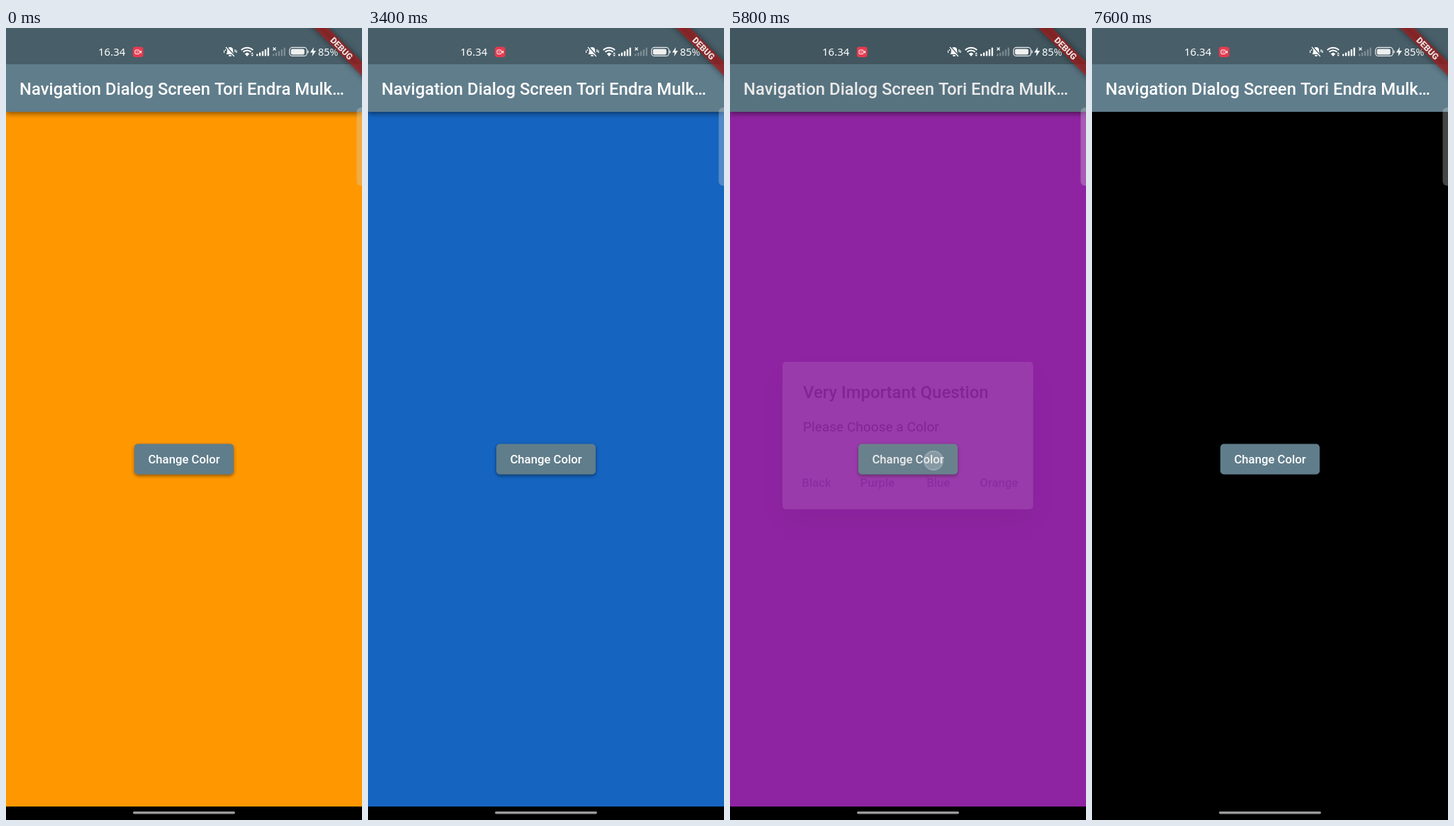
Animation of 502x1115 px, one loop 8 s. Source, as an HTML page with a canvas:

```html
<!DOCTYPE html>
<html lang="en">
<head>
<meta charset="utf-8">
<title>Dialog colour picker</title>
<style>
  html, body { margin: 0; width: 100%; height: 100%; overflow: hidden; background: #000; }
  canvas { display: block; width: 100vw; height: 100vh; }
</style>
</head>
<body>
<canvas id="stage" width="502" height="1115"></canvas>
<script>
const W = 502, H = 1115, LOOP = 8000;
const BODY_TOP = 118, BODY_END = 1096;
const ORANGE = '#ff9800', BLUE = '#1565c0', PURPLE = '#9c27b0', BLACK = '#000';
const SLATE = '#607d8b';
const SANS = 'Roboto, sans-serif';

const ctx = document.getElementById('stage').getContext('2d');

// Touch points: x, y, opacity
const onBlue = [304, 647, 1], onPurple = [231, 636, 0.9], onBlack = [128, 640, 1];
const onButton = [287, 609, 0.45];
// Pressed highlights: x, y, width, height, opacity
const pressBlue = [257, 619, 75, 42, 0.05], pressPurple = [179, 618, 67, 42, 0.2];
const pressBlack = [88, 619, 68, 42, 0.05];

// The screen changes in hard steps: start time, body colour, barrier, dialog opacity, press, touch
const steps = [
  [0, ORANGE, 0, 0],
  [2000, ORANGE, 1, 1],
  ...choose(3200, ORANGE, BLUE, pressBlue, onBlue),
  ...open(4200, BLUE),
  ...choose(5200, BLUE, PURPLE, pressPurple, onPurple),
  ...open(5800, PURPLE),
  ...choose(6500, PURPLE, BLACK, pressBlack, onBlack)
];

function open(t, color) {
  return [
    [t, color, 0.15, 0.1, null, onButton],
    [t + 100, color, 0.7, 0.6, null, onButton],
    [t + 200, color, 1, 0.9, null, onButton],
    [t + 300, color, 1, 1]
  ];
}

function choose(t, from, to, press, touch) {
  const held = [...press.slice(0, 4), 0.2];
  return [
    [t, from, 1, 1, press, touch],
    [t + 100, to, 0.69, 0.69, held, touch],
    [t + 200, to, 0, 0]
  ];
}

function rect(c, x, y, w, h, color, r = 0) {
  c.fillStyle = color;
  c.beginPath();
  c.roundRect(x, y, w, h, r);
  c.fill();
}

function text(c, str, x, y, font, color, align = 'left') {
  c.font = font;
  c.fillStyle = color;
  c.textAlign = align;
  c.fillText(str, x, y);
}

function poly(points, color = '#fff') {
  ctx.fillStyle = color;
  ctx.beginPath();
  points.forEach(([x, y]) => ctx.lineTo(x, y));
  ctx.fill();
}

function line(x1, y1, x2, y2, color = '#fff', width = 1.5) {
  ctx.strokeStyle = color;
  ctx.lineWidth = width;
  ctx.beginPath();
  ctx.moveTo(x1, y1);
  ctx.lineTo(x2, y2);
  ctx.stroke();
}

function arc(x, y, r, a, b, width) {
  ctx.strokeStyle = '#fff';
  ctx.lineWidth = width;
  ctx.beginPath();
  ctx.arc(x, y, r, a, b);
  ctx.stroke();
}

function shadow(c, color, blur, dy) {
  c.shadowColor = color;
  c.shadowBlur = blur;
  c.shadowOffsetY = dy;
}

// The dialog is one layer, so that it fades as a whole
const dialog = document.createElement('canvas');
dialog.width = W;
dialog.height = H;

function paintDialog() {
  const c = dialog.getContext('2d');
  c.save();
  shadow(c, 'rgba(0,0,0,.45)', 38, 20);
  rect(c, 74, 470, 353.5, 207.5, '#fff', 5);
  c.restore();
  text(c, 'Very Important Question', 103, 521, `500 23.9px ${SANS}`, '#1f1f21');
  text(c, 'Please Choose a Color', 103, 568, `400 19.1px ${SANS}`, '#1f1f21');
  [['Black', 122], ['Purple', 207.7], ['Blue', 293.8], ['Orange', 379.3]].forEach(([name, x]) =>
    text(c, name, x, 645.5, `500 16.7px ${SANS}`, SLATE, 'center'));
}

function paintPage(color) {
  rect(ctx, 0, 0, W, H, '#000');
  rect(ctx, 0, BODY_TOP, W, BODY_END - BODY_TOP, color);

  ctx.save();
  shadow(ctx, 'rgba(0,0,0,.45)', 7, 3);
  rect(ctx, 0, 0, W, BODY_TOP, SLATE);
  shadow(ctx, 'rgba(0,0,0,.45)', 5, 2);
  rect(ctx, 181, 585.5, 140, 43, SLATE, 5);
  ctx.restore();

  rect(ctx, 0, 0, W, 51, '#485e68');
  text(ctx, 'Navigation Dialog Screen Tori Endra Mulk…', 19, 93.6, `500 23.9px ${SANS}`, '#fff');
  text(ctx, 'Change Color', 251, 613, `500 16.7px ${SANS}`, '#fff', 'center');
}

function paintTouch([x, y, alpha]) {
  ctx.save();
  ctx.globalAlpha = alpha;
  ctx.beginPath();
  ctx.arc(x, y, 13.2, 0, 7);
  ctx.fillStyle = 'rgba(236,240,244,.5)';
  ctx.fill();
  ctx.strokeStyle = 'rgba(200,212,221,.85)';
  ctx.lineWidth = 2;
  ctx.stroke();
  ctx.restore();
}

function paintBell() {
  ctx.fillStyle = '#fff';
  ctx.beginPath();
  ctx.moveTo(310.5, 37);
  ctx.quadraticCurveTo(312, 35.5, 312, 32);
  ctx.arc(316, 31.2, 4.1, Math.PI, 0);
  ctx.quadraticCurveTo(320, 35.5, 321.5, 37);
  ctx.fill();
  rect(ctx, 314, 38, 4, 1.8, '#fff', 1);
  line(311, 26.5, 322.5, 39.5, '#485e68', 2);
  line(310, 27, 321.8, 40, '#fff', 1.3);
  line(307.6, 31.5, 307.6, 35, '#fff', 1.2);
  line(309.6, 30, 309.6, 32, '#fff', 1.2);
  line(325, 31.5, 325, 35, '#fff', 1.2);
  line(323, 30, 323, 34, '#fff', 1.2);
}

function paintStatus() {
  const small = '"Noto Sans", sans-serif';
  text(ctx, '16.34', 130, 39, `500 15px ${small}`, '#fff');

  rect(ctx, 179, 26.5, 14.5, 14.5, '#e63b50', 3);
  ctx.strokeStyle = '#fff';
  ctx.lineWidth = 1;
  ctx.beginPath();
  ctx.roundRect(182, 31, 6, 5.5, 1);
  ctx.stroke();
  rect(ctx, 184.2, 33, 1.6, 1.6, '#fff', 0.8);
  poly([[188.5, 33.8], [191, 31.5], [191, 36]]);

  paintBell();

  const from = -Math.PI * 0.75, to = -Math.PI * 0.25;
  arc(340, 39.3, 11.6, from, to, 1.9);
  arc(340, 39.3, 7.8, from, to, 1.9);
  poly([[340, 40], [336.7, 36.2], [340, 34.6], [343.3, 36.2]]);
  poly([[345.4, 36.4], [347.2, 34.2], [349, 36.4]]);
  poly([[345.4, 37.8], [347.2, 40], [349, 37.8]]);

  [3, 5, 7.2, 9.5, 12].forEach((h, i) => {
    rect(ctx, 353 + i * 3.9, 39.6 - h, 2.3, h, '#fff', 0.8);
    rect(ctx, 376 + i * 3.9, 39.6 - h, 2.3, h, 'rgba(255,255,255,.3)', 0.8);
  });
  line(376.5, 27.5, 380.5, 31.5, '#fff', 1.1);
  line(380.5, 27.5, 376.5, 31.5, '#fff', 1.1);

  ctx.strokeStyle = '#e8ecee';
  ctx.lineWidth = 1.2;
  ctx.beginPath();
  ctx.roundRect(399.8, 27.4, 24.6, 12, 4);
  ctx.stroke();
  rect(ctx, 401.8, 29.4, 19, 8, '#f0f0f0', 2.2);
  rect(ctx, 425.4, 31.4, 1.3, 4, '#e8ecee', 0.6);
  poly([[434, 27], [429, 34.6], [432.4, 34.6], [431.6, 40], [437, 32], [433.4, 32]]);
  text(ctx, '85%', 440, 39, `500 14.4px ${small}`, '#fff');
}

function paintBanner() {
  ctx.save();
  ctx.translate(W, 0);
  ctx.rotate(Math.PI / 4);
  ctx.save();
  shadow(ctx, 'rgba(0,0,0,.75)', 8, 0);
  rect(ctx, -70, 33.5, 140, 14.3, 'rgba(183,28,28,.63)');
  ctx.restore();
  text(ctx, 'DEBUG', 0, 45, `900 12.2px ${SANS}`, 'rgba(255,255,255,.85)', 'center');
  ctx.restore();
}

function draw(t) {
  const [, color, dim, alpha, press, touch] = steps.findLast(s => s[0] <= t);
  paintPage(color);
  rect(ctx, 0, 0, W, BODY_END, `rgba(0,0,0,${0.54 * dim})`);
  if (alpha) {
    ctx.globalAlpha = alpha;
    ctx.drawImage(dialog, 0, 0);
    ctx.globalAlpha = 1;
  }
  if (press) {
    const [x, y, w, h, a] = press;
    rect(ctx, x, y, w, h, `rgba(96,125,139,${a})`, 4);
  }
  if (touch) paintTouch(touch);
  paintStatus();
  rect(ctx, 494.5, 112, 14, 110, 'rgba(215,215,215,.32)', 6);
  paintBanner();
  rect(ctx, 179, 1103, 144, 3.6, '#999', 1.8);
}

paintDialog();
const start = performance.now();
function tick() {
  draw((performance.now() - start) % LOOP);
  requestAnimationFrame(tick);
}
tick();
</script>
</body>
</html>
```
